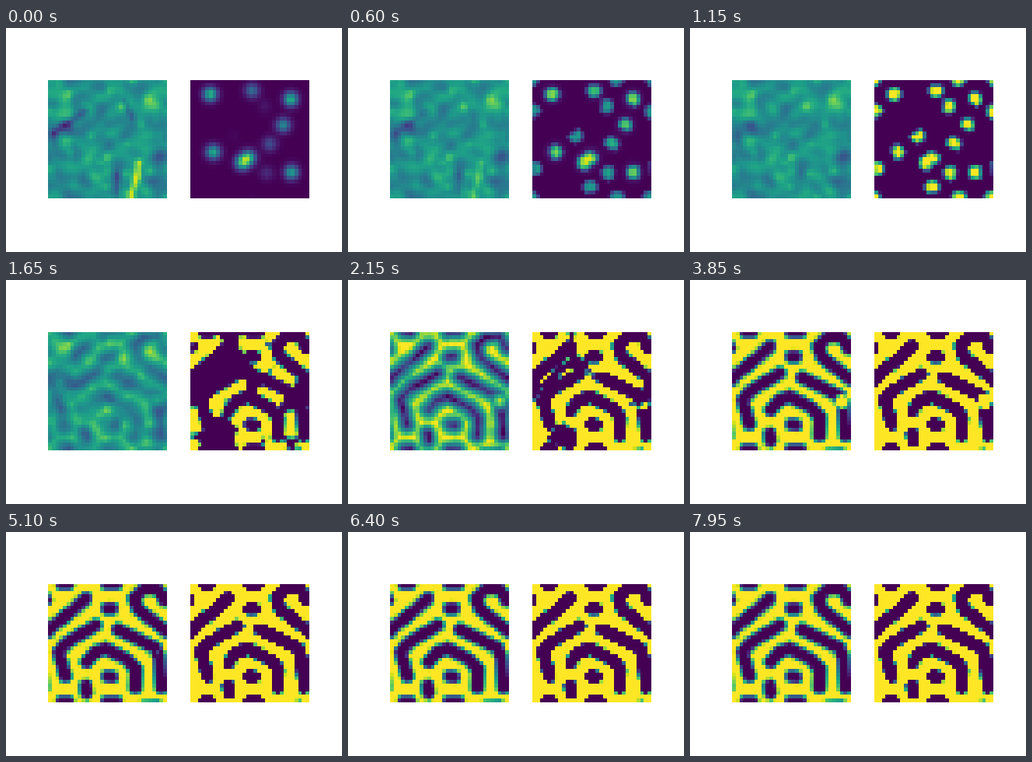
These frames come from a looping animation (432x288 px, 8000 ms). A matplotlib script:

```python
import numpy as np
import matplotlib.pyplot as plt
from matplotlib.animation import FuncAnimation

N = 32
FRAMES, STEP = 160, 50
BAND = 1.75                      # half width of a dark band, in cells
SEEDED, SETTLED = 1150, 3850     # ms: spots are ripe, pattern is complete

axis = np.arange(N) + 0.5
Z = axis[None, :] + 1j * axis[:, None]


def dist(*points):
    """Distance of every cell to a polyline on the wrapped grid."""
    near = []
    for a, b in zip(points, points[1:] or points):
        mid, half = (a + b) / 2, (b - a) / 2
        rel = Z - mid
        rel = (rel.real + N / 2) % N + 1j * ((rel.imag + N / 2) % N) - N / 2 * (1 + 1j)
        along = (rel * np.conj(half)).real / (abs(half) ** 2 + 1e-9)
        near.append(abs(rel - half * np.clip(along, -1, 1)))
    return np.min(near, axis=0)


def ramp(t, start, end):
    return min(max((t - start) / (end - start), 0), 1)


def ease(u):
    return u * u * (3 - 2 * u)


# Centre lines of the dark bands, as x + yj
bands = [
    (3.7 + 0j, 5.4 + 0j),
    (15.8 + 0j, 18.3 + 0j),
    (15.9 + 6.8j, 17.2 + 6.8j),
    (0.3 + 12.3j, 7 + 7j, 10.2 + 4j),
    (32 + 13j, 29 + 10.7j, 24.2 + 7j, 23.2 + 4j, 25.6 + 1.5j, 29.4 + 1.3j, 31.3 + 4.5j),
    (12.8 + 11.3j, 5 + 16j, 2.8 + 18.5j, 4.7 + 25j),
    (10.4 + 21.2j, 12.4 + 18.7j, 15.5 + 17.5j, 21.5 + 20.6j, 23.7 + 23.2j, 23.5 + 28j),
    (18.8 + 12.4j, 22 + 14j, 29 + 17.4j, 29.9 + 20j, 30.5 + 28j),
    (10.2 + 27.6j, 10.4 + 29.5j),
    (16 + 25j, 17.2 + 25.2j),
]
bright = np.min([dist(*line) for line in bands], axis=0) - BAND
gap = dist(29.6 + 18.9j)

# Places where the bright phase starts, the ripest first
spots = [14 + 22.4j, 15.7 + 21j, 5.4 + 4j, 27 + 5.4j, 6.2 + 19.6j, 27.2 + 25j, 25 + 12.3j,
         16.6 + 3j, 21.3 + 17.4j, 20.5 + 25.2j, 20 + 7.2j, 11.6 + 15.2j, 15.6 + 29j,
         0.6 + 24j, 0.3 + 8.7j, 22.8 + 0j, 31.6 + 0j]
away = [dist(s) for s in spots]
near = np.min(away, axis=0)
glow = sum(0.65 * np.exp(-(k / 8) ** 4 - (d / 1.9) ** 2) for k, d in enumerate(away))

# Smooth seeded noise with a few early marks
rng = np.random.default_rng(4)
f = np.fft.fftfreq(N)
blur = np.exp(-30 * (f[:, None] ** 2 + f[None, :] ** 2))
noise = np.fft.ifft2(np.fft.fft2(rng.normal(size=(N, N))) * blur).real
noise /= noise.std()
streak = 0.4 * np.exp(-dist(24.3 + 22.5j, 24 + 26j, 22.3 + 31j) ** 2)
for line in [(1.5 + 14.5j, 10 + 8.5j), (20.5 + 6j, 22.5 + 10j), (18.5 + 26j, 18.5 + 31j)]:
    streak -= 0.2 * np.exp(-dist(*line) ** 2)
buds = 0.18 * np.exp(-(near / 1.3) ** 2)


def depth(t):
    """Signed depth in the bright phase; the gap in the right-hand band closes late."""
    opening = 2 - 4 * ease(ramp(t, SETTLED, 6400))
    return np.maximum(bright, opening - gap)


def potential(t):
    u = ramp(t, SEEDED, SETTLED)
    rough = 0.07 * noise + buds + (1 - ramp(t, 0, SEEDED)) * streak
    return 0.5 + (1 - u) * rough + 0.85 * ease(u) * depth(t)


def output(t):
    # Bright spots ripen, then spread along the corridors between the bands
    reach = 1.8 + 5.5 * max(t - SEEDED, 0) / 1500
    sharp = 0.7 + 3.3 * ramp(t, SEEDED, 2650)
    grown = np.clip(0.5 + sharp * np.minimum(depth(t), reach - near), 0, 1)
    u = ramp(t, 0, SEEDED)
    return (1 - u) * glow + u * grown


fig, axes = plt.subplots(1, 2, figsize=(6, 4), dpi=72, facecolor="white")
fig.subplots_adjust(left=0.125, right=0.9, bottom=0.125, top=0.88, wspace=0.2)
images = []
for ax in axes:
    ax.axis("off")
    images.append(ax.imshow(np.zeros((N, N)), cmap="viridis", vmin=0, vmax=1,
                            interpolation="nearest"))


def draw(i):
    t = i * STEP
    for image, field in zip(images, (potential, output)):
        image.set_data(np.clip(field(t), 0, 1))
    return images


anim = FuncAnimation(fig, draw, frames=FRAMES, interval=STEP, repeat=True, repeat_delay=0,
                     init_func=lambda: draw(0))
plt.show()
```
